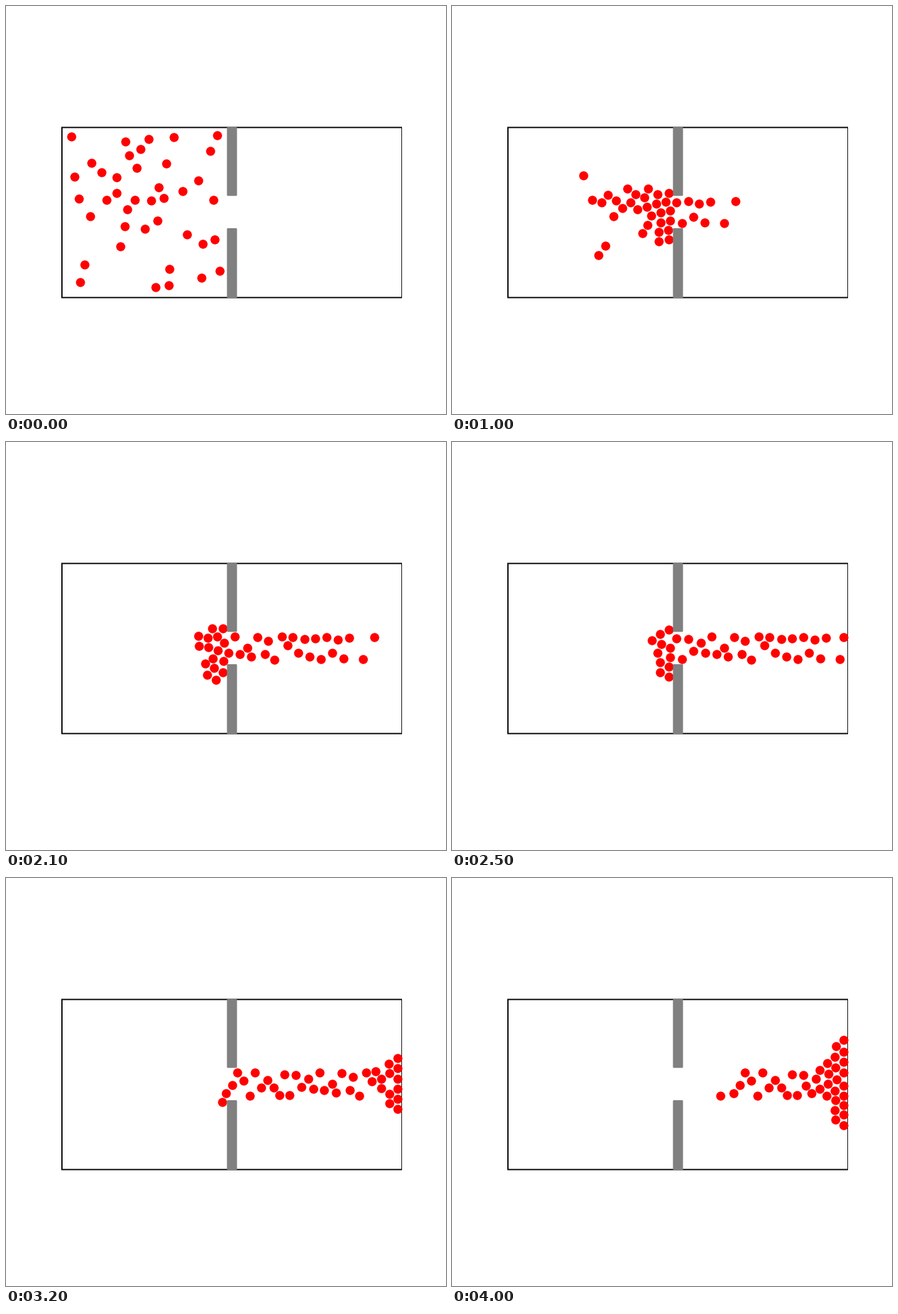
A matplotlib script that plays this animation: 700x650 px, repeating every 4100 ms.

```python
import numpy as np
import matplotlib.pyplot as plt
from matplotlib.animation import FuncAnimation
from matplotlib.patches import FancyBboxPatch

W, H, DPI = 700, 650, 100
FRAMES, INTERVAL = 41, 100
SUBSTEPS = 4             # simulation steps per frame
SPEED = 12.25            # walking speed, px per frame
RADIUS, SPACING = 7, 15.5
PACE = 0.75              # frames between two walkers in the doorway

ROOM_L, ROOM_R, ROOM_TOP, ROOM_BOTTOM = 89, 630, 193.5, 464.5
WALL_L, WALL_R = 351.5, 367.5
DOOR_TOP, DOOR_BOTTOM = 302.5, 354
LANE_TOP, LANE_BOTTOM = 310, 346.5
GATE = 347               # walkers wait here for their turn

START = np.array([
    (104, 207.5), (108.5, 272), (116, 307), (134, 335), (136, 250),
    (152, 265), (160, 308.5), (176, 272.5), (176, 297.5), (190, 215.5),
    (196, 237.5), (214, 228), (227, 211.5), (208, 258), (205, 308.5),
    (193, 324), (188.5, 350.5), (182, 382.5), (221, 354.5), (241, 342),
    (230.5, 310), (243, 289), (251, 306), (255, 251), (267, 209),
    (281, 294.5), (306, 277.5), (330, 308.5), (325, 231), (336, 206),
    (287.5, 364), (312.5, 378.5), (332, 372), (311, 433), (340, 422),
    (260, 418.5), (258.5, 445), (237.5, 447.5), (125, 412), (118, 439.5),
])


def heading(pos, passed):
    """Straight on when level with the door, otherwise to its lower post."""
    x, y = pos.T
    level = (y >= LANE_TOP - 1) & (y <= DOOR_BOTTOM + 1)
    lane = np.where(x > 290, np.clip(y, LANE_TOP, LANE_BOTTOM), y)
    aim_y = np.where(level, lane, DOOR_BOTTOM)
    way = np.column_stack([np.maximum(352 - x, 8), aim_y - y])
    way[passed] = (1, 0)
    return way / np.hypot(*way.T)[:, None]


def confine(pos, passed):
    """Keep walkers out of the walls and the queue behind the gate."""
    x, y = pos.T
    x = np.clip(x, np.where(passed, GATE, ROOM_L + RADIUS),
                np.where(passed, ROOM_R - RADIUS, GATE))
    y = np.where(passed & (x < WALL_R + RADIUS),
                 np.clip(y, LANE_TOP, LANE_BOTTOM), y)
    pos = np.column_stack([x, y])
    for edge in (np.minimum(y, DOOR_TOP), np.maximum(y, DOOR_BOTTOM)):
        near = np.column_stack([np.full_like(x, WALL_L), edge])
        gap = pos - near
        dist = np.hypot(*gap.T)
        hit = ~passed & (dist < RADIUS)
        pos[hit] = near[hit] + RADIUS * gap[hit] / dist[hit, None]
    return pos


def separate(pos, passed):
    """Push apart walkers that stand closer than their spacing."""
    for _ in range(25):
        gap = pos[:, None] - pos[None]
        dist = np.hypot(gap[..., 0], gap[..., 1])
        np.fill_diagonal(dist, np.inf)
        push = 0.4 * np.clip(SPACING - dist, 0, None) / dist
        pos = confine(pos + (gap * push[..., None]).sum(axis=1), passed)
    return pos


def simulate():
    pos = START.copy()
    passed = np.zeros(len(pos), bool)
    opens, last_y = 0, LANE_BOTTOM
    history = [pos]
    for step in range(1, (FRAMES - 1) * SUBSTEPS + 1):
        now = step / SUBSTEPS
        pos = pos + heading(pos, passed) * SPEED / SUBSTEPS
        pos = separate(confine(pos, passed), passed)

        # The next one through is the one farthest from the one before.
        x, y = pos.T
        ready = (~passed & (x > GATE - 2)
                 & (y > LANE_TOP - 2) & (y < LANE_BOTTOM + 2))
        if ready.any() and now >= opens:
            k = np.argmax(np.where(ready, abs(y - last_y), -1))
            passed[k] = True
            opens, last_y = now + PACE, y[k]
        if step % SUBSTEPS == 0:
            history.append(pos)
    return history


def pt(px):
    return px * 72 / DPI


HISTORY = simulate()

fig = plt.figure(figsize=(W / DPI, H / DPI), dpi=DPI, facecolor="white")
ax = fig.add_axes([0, 0, 1, 1])
ax.set_xlim(0, W)
ax.set_ylim(H, 0)
ax.axis("off")

ax.plot([ROOM_R, ROOM_L, ROOM_L, ROOM_R],
        [ROOM_TOP, ROOM_TOP, ROOM_BOTTOM, ROOM_BOTTOM],
        color="black", lw=pt(2), solid_capstyle="butt",
        solid_joinstyle="miter", snap=False, zorder=1)
ax.plot([ROOM_R - 0.5] * 2, [ROOM_TOP, ROOM_BOTTOM], color="black",
        lw=pt(1), solid_capstyle="butt", snap=False, zorder=1)

for top, bottom in ((ROOM_TOP - 1, DOOR_TOP), (DOOR_BOTTOM, ROOM_BOTTOM + 1)):
    ax.add_patch(FancyBboxPatch(
        (WALL_L, top), WALL_R - WALL_L, bottom - top,
        boxstyle="round,pad=0,rounding_size=1.5",
        facecolor="gray", edgecolor="none", zorder=3))

dots = ax.scatter(*START.T, s=pt(14.4) ** 2, color="red",
                  linewidths=0, zorder=2)


def update(n):
    dots.set_offsets(HISTORY[n])
    return (dots,)


anim = FuncAnimation(fig, update, frames=FRAMES, interval=INTERVAL,
                     repeat=True, repeat_delay=0)
plt.show()
```
